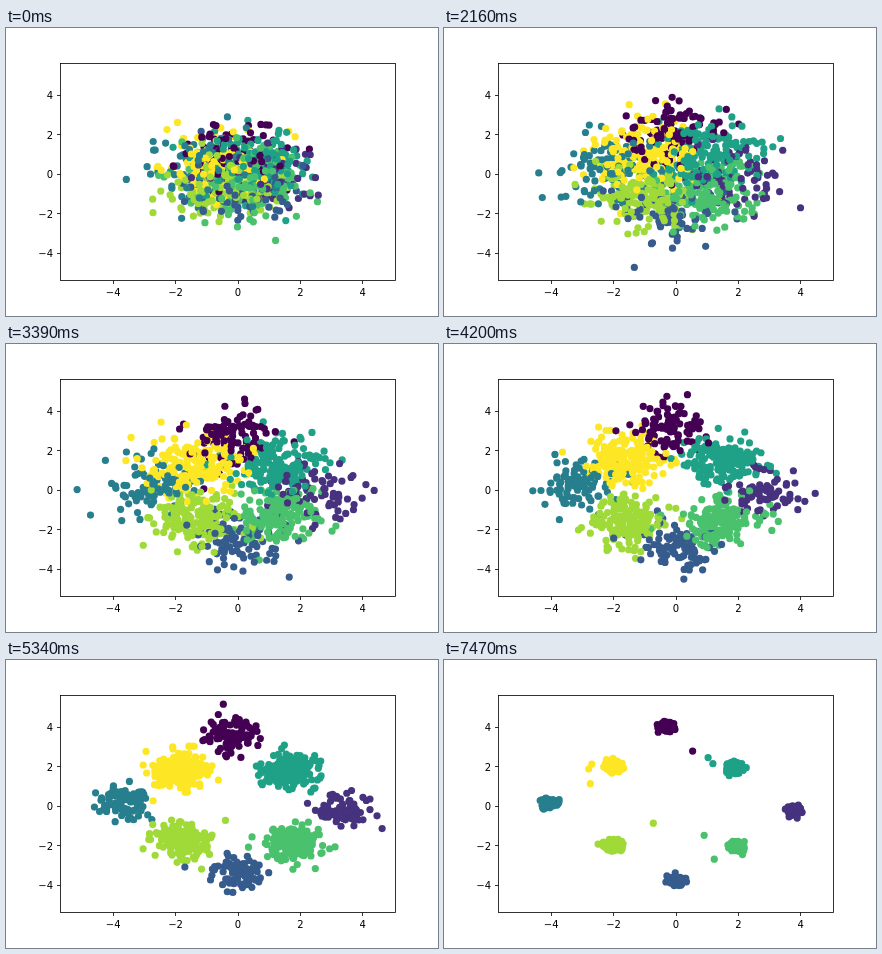
These frames come from a looping animation (432x288 px, 7.5 s). An HTML page:

```html
<!DOCTYPE html>
<html lang="en">
<head>
<meta charset="utf-8">
<title>Scatter diffusion</title>
<style>
  html, body { margin: 0; width: 100%; height: 100%; overflow: hidden; background: #fff; }
  svg { display: block; }
  text { font: 10px "DejaVu Sans", sans-serif; fill: #000; }
  .axis { fill: none; stroke: #000; stroke-width: .8; }
</style>
</head>
<body>
<svg id="stage" width="432" height="288" viewBox="0 0 432 288">
  <g id="dots"></g>
  <g id="axes"></g>
</svg>
<script>
const STEPS = 250, STEP_MS = 30, COUNT = 1000;
const BETA_MIN = 1e-4, BETA_MAX = 0.02;
const SPREAD = 0.12, STRAY_SPREAD = 0.6, STRAY_CHANCE = 0.012;

// Outer diamond first, then the inner square; the square draws more points
const cluster = (x, y, share, color) => ({ x, y, share, color });
const clusters = [
  cluster(-0.28, 3.97, 0.65, '#440154'),
  cluster(3.78, -0.2, 0.45, '#46327e'),
  cluster(0, -3.8, 0.5, '#365c8d'),
  cluster(-4.1, 0.15, 0.6, '#277f8e'),
  cluster(1.9, 1.95, 1, '#1fa187'),
  cluster(1.95, -2.05, 1, '#4ac16d'),
  cluster(-2.05, -2, 1, '#a0da39'),
  cluster(-2, 2, 1, '#fde725')
];

const toX = x => 232 + x * 31.2;
const toY = y => 146 - y * 19.75;

function makeRandom(seed) {
  return () => {
    seed = (seed + 0x6D2B79F5) | 0;
    let h = Math.imul(seed ^ (seed >>> 15), 1 | seed);
    h = (h + Math.imul(h ^ (h >>> 7), 61 | h)) ^ h;
    return ((h ^ (h >>> 14)) >>> 0) / 4294967296;
  };
}
const random = makeRandom(7);
const gauss = () => Math.sqrt(-2 * Math.log(1 - random())) * Math.cos(2 * Math.PI * random());

const points = Array.from({ length: COUNT }, () => ({
  x: gauss(),
  y: gauss(),
  spread: random() < STRAY_CHANCE ? STRAY_SPREAD : SPREAD
}));

// Expected cluster centre for a point seen at the given signal scale and variance
function expectedCentre(p, scale, variance) {
  const dist = clusters.map(c => (p.x - scale * c.x) ** 2 + (p.y - scale * c.y) ** 2);
  const nearest = Math.min(...dist);
  let total = 0, x = 0, y = 0;
  clusters.forEach((c, k) => {
    const weight = c.share * Math.exp((nearest - dist[k]) / (2 * variance));
    total += weight;
    x += weight * c.x;
    y += weight * c.y;
  });
  return { x: x / total, y: y / total };
}

// Reverse diffusion from unit noise to the cluster mixture
function simulate() {
  const betas = Array.from({ length: STEPS }, (_, i) => BETA_MIN + (BETA_MAX - BETA_MIN) * i / (STEPS - 1));
  const kept = [];
  betas.reduce((product, beta, i) => kept[i] = product * (1 - beta), 1);

  const history = [];
  for (let i = STEPS - 1; i >= 0; i--) {
    const beta = betas[i], scale = Math.sqrt(kept[i]);
    const noise = i ? Math.sqrt(beta) : 0, grow = 1 / Math.sqrt(1 - beta);
    for (const p of points) {
      const variance = kept[i] * p.spread ** 2 + 1 - kept[i];
      const centre = expectedCentre(p, scale, variance);
      for (const axis of ['x', 'y']) {
        const pull = beta * (scale * centre[axis] - p[axis]) / variance;
        p[axis] = (p[axis] + pull) * grow + noise * gauss();
      }
    }
    history.push(points.map(({ x, y }) => ({ x, y })));
  }
  return history;
}

const history = simulate();

function nearestCluster(p) {
  const gaps = clusters.map(c => Math.hypot(p.x - c.x, p.y - c.y));
  return clusters[gaps.indexOf(Math.min(...gaps))];
}

function add(parent, tag, attrs, content = '') {
  const node = document.createElementNS('http://www.w3.org/2000/svg', tag);
  for (const name in attrs) node.setAttribute(name, attrs[name]);
  node.textContent = content;
  return parent.appendChild(node);
}

const axes = document.getElementById('axes');
add(axes, 'rect', { class: 'axis', x: 54.5, y: 35.5, width: 335, height: 217 });
for (let value = -4; value <= 4; value += 2) {
  const label = String(value).replace('-', '\u2212');
  const x = Math.floor(toX(value)) + .5, y = Math.floor(toY(value)) + .5;
  add(axes, 'path', { class: 'axis', d: `M${x} 252.5v3.5M54.5 ${y}h-3.5` });
  add(axes, 'text', { x: toX(value), y: 268, 'text-anchor': 'middle' }, label);
  add(axes, 'text', { x: 47, y: toY(value) + 4, 'text-anchor': 'end' }, label);
}

const layer = document.getElementById('dots');
const dots = points.map(p => add(layer, 'circle', { r: 3.6, fill: nearestCluster(p).color }));

let shown = -1;
function draw(time) {
  const step = Math.floor(time / STEP_MS) % STEPS;
  if (step === shown) return;
  shown = step;
  history[step].forEach((p, n) => {
    dots[n].setAttribute('cx', toX(p.x).toFixed(2));
    dots[n].setAttribute('cy', toY(p.y).toFixed(2));
  });
}

function tick() {
  draw(performance.now());
  requestAnimationFrame(tick);
}
draw(0);
requestAnimationFrame(tick);
</script>
</body>
</html>
```
